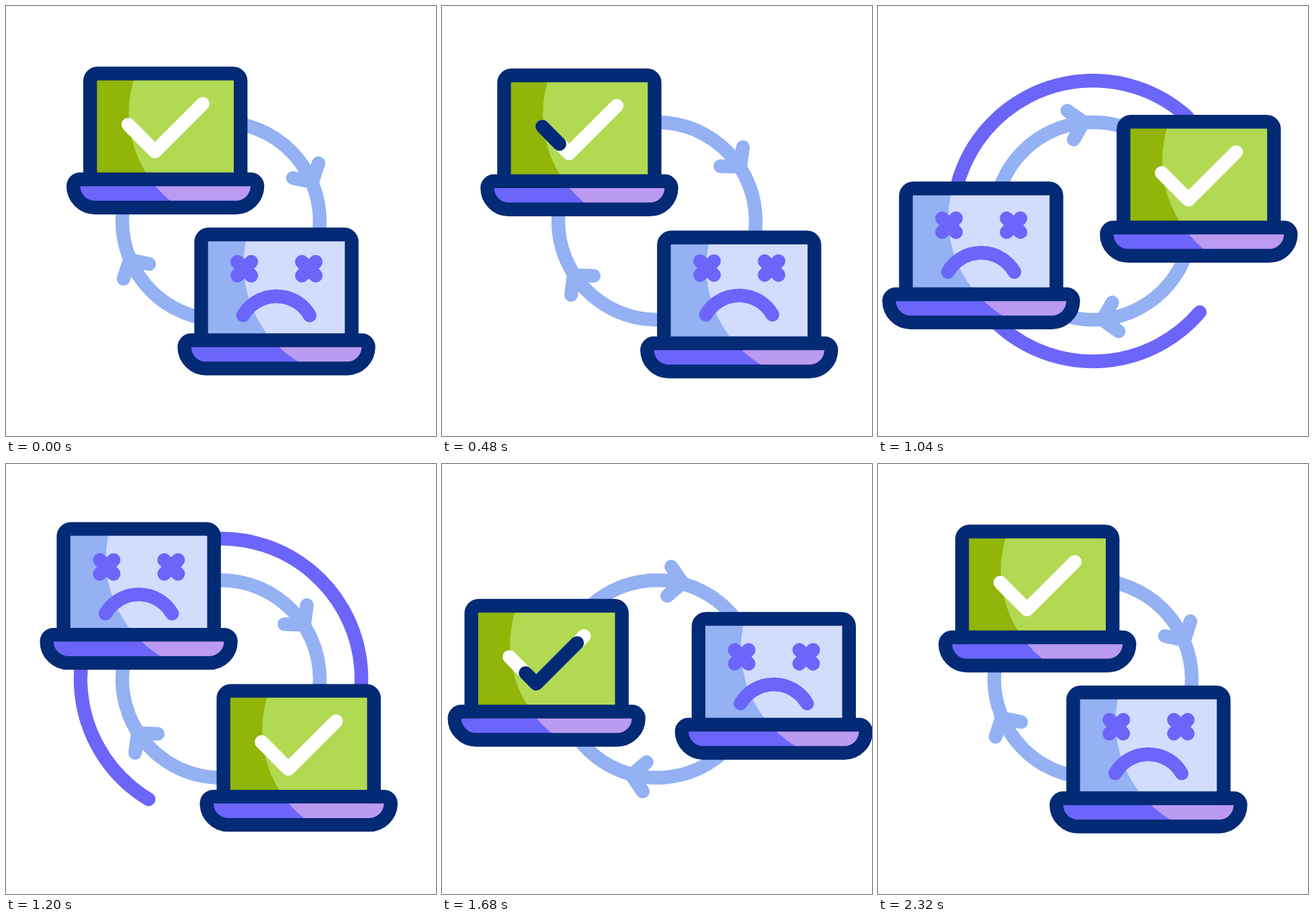
An HTML page for the animation above (3 s loop, 640 by 640 pixels).

```html
<!DOCTYPE html>
<html lang="en">
<head>
<meta charset="utf-8">
<title>Laptop exchange</title>
<style>
  html, body { margin: 0; height: 100%; overflow: hidden; background: #fff; }
  svg { display: block; width: 100vw; height: 100vh; }
  .line { fill: none; stroke-width: 20.4; stroke-linecap: round; stroke-linejoin: round; }
  .navy { stroke: #032a74; }
  .sky { stroke: #93b1f3; }
  .violet { stroke: #6b65fa; }
  .white { stroke: #fff; }
</style>
</head>
<body>
<svg id="stage" viewBox="0 0 640 640"></svg>
<script>
const LID = 'M-112 58V-88.5a11 11 0 0 1 11-11H101a11 11 0 0 1 11 11V58';
const BASE = 'M-127 58H127a10 10 0 0 1 10 10a32 32 0 0 1-32 32H-105a32 32 0 0 1-32-32a10 10 0 0 1 10-10z';
const CHECK = 'M-55.2-23.4L-15.4 16.6L55.6-54.4';
const ARROW = '<path d="M145-86L136-58L107-64"/>';

const laptop = (id, dark, light, cx, cy, content) => {
  const shine = (fill, clip) =>
    `<g clip-path="url(#${clip})"><circle cx="${cx}" cy="${cy}" r="170" fill="${fill}"/></g>`;
  return `<g id="${id}">
    <path d="${LID}" fill="${dark}"/>${shine(light, 'lid')}
    <path d="${BASE}" fill="#6b65fa"/>${shine('#bb9af2', 'base')}
    <path class="line navy" d="${LID}"/><path class="line navy" d="${BASE}"/>
    ${content}</g>`;
};

const eye = x => `<path d="M${x - 10.3}-58.8l20.6 20.6m0-20.6l-20.6 20.6"/>`;

const $ = id => document.getElementById(id);

$('stage').innerHTML = `
  <clipPath id="lid"><path d="${LID}"/></clipPath>
  <clipPath id="base"><path d="${BASE}"/></clipPath>
  <g id="ring" class="line sky">
    <circle r="147"/>${ARROW}<g transform="rotate(180)">${ARROW}</g>
  </g>
  <circle id="trail" class="line violet" r="209" pathLength="1" transform="translate(320 320) rotate(40)"/>
  ${laptop('sad', '#93b1f3', '#d2dcfd', 121, -55,
    `<g id="face" class="line violet">${eye(-47.8)}${eye(48.2)}<path d="M-49.5 21A57.2 57.2 0 0 1 49.5 21"/></g>`)}
  ${laptop('happy', '#91b508', '#b2d952', 115.6, -41,
    `<path class="line white" d="${CHECK}"/><path id="sweep" class="line navy" pathLength="1" d="${CHECK}"/>`)}`;

// Smooth 0 to 1 between two times
function ramp(t, from, to) {
  const x = Math.min(1, Math.max(0, (t - from) / (to - from)));
  return x * x * (3 - 2 * x);
}

// cubic-bezier(1/3, 0, 0.396, 1)
function spinEase(x) {
  if (x <= 0 || x >= 1) return x <= 0 ? 0 : 1;
  let low = 0, high = 1, u;
  for (let i = 0; i < 30; i++) {
    u = (low + high) / 2;
    const v = 1 - u;
    if (u * v * v + 1.188 * u * u * v + u * u * u < x) low = u; else high = u;
  }
  return u * u * (3 - 2 * u);
}

function trim(el, start, end) {
  el.style.visibility = end - start > 0.0005 ? 'visible' : 'hidden';
  el.style.strokeDasharray = `${end - start} 2`;
  el.style.strokeDashoffset = -start;
}

function place(id, x, y, scale, degrees) {
  const a = degrees * Math.PI / 180, c = Math.cos(a) * scale, s = Math.sin(a) * scale;
  $(id).setAttribute('transform', `translate(${320 + x * c - y * s} ${320 + x * s + y * c})`);
}

function draw(t) {
  const angle = -10 * ramp(t, 0, 480) + 370 * spinEase((t - 480) / 1840);
  const spread = ramp(t, 0, 480) - ramp(t, 1800, 2320);
  $('ring').setAttribute('transform', `translate(320 320) rotate(${angle})`);
  place('happy', -82.8, -120, 1 + 0.129 * spread, angle);
  place('sad', 82.5, 119.5, 1 + 0.199 * spread, angle);

  const bob = -5.5 * ramp(t, 0, 480) + 7 * ramp(t, 480, 840) + 4 * ramp(t, 840, 1200)
    + 3.5 * ramp(t, 1680, 2000) - 9 * ramp(t, 2000, 2320);
  $('face').setAttribute('transform', `translate(0 ${bob})`);

  const pass = t < 1200 ? 355 : 1355;
  trim($('sweep'), ramp(t, pass + 205, pass + 605), ramp(t, pass, pass + 400));
  trim($('trail'), ramp(t, 1028, 1588), ramp(t, 660, 1220));
}

// 25 steps per second, 3 s loop
function tick() {
  draw(Math.floor(performance.now() % 3000 / 40) * 40);
  requestAnimationFrame(tick);
}
tick();
</script>
</body>
</html>
```
